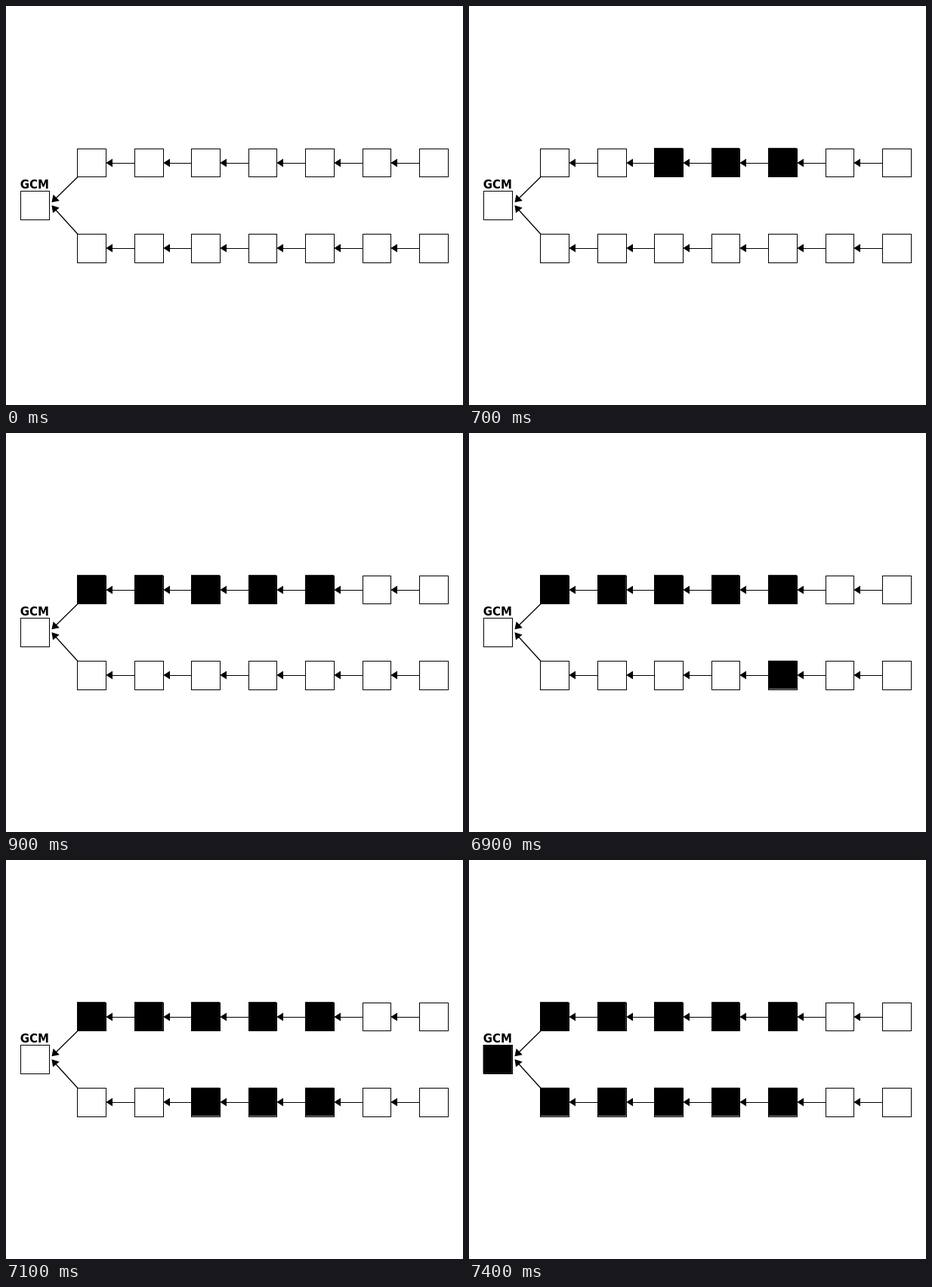
Animation, 605 px wide and 529 px high, one loop 7.5 s. Source, as an HTML page:

```html
<!DOCTYPE html>
<html lang="en">
<head>
<meta charset="utf-8">
<title>Marking two chains</title>
<style>
  html, body { margin: 0; width: 100%; height: 100%; overflow: hidden; background: #fff; }
  svg { display: block; width: 605px; height: 529px; }
  text { font: bold 15px "DejaVu Sans", Verdana, sans-serif; }
  .line { fill: none; stroke: #000; stroke-width: 1; }
  .slant { stroke-width: 1.3; }
</style>
</head>
<body>
<svg id="stage" viewBox="0 0 605 529">
  <text x="18.8" y="242">GCM</text>
</svg>
<script>
const LOOP = 7500, STEP = 100;
const stage = document.getElementById('stage');
const lefts = [94, 170, 245, 321, 396, 472, 547];
const rights = [132, 208, 283, 358, 434, 509, 585];
const marks = [];

function add(name, attrs) {
  const el = document.createElementNS('http://www.w3.org/2000/svg', name);
  for (const key in attrs) el.setAttribute(key, attrs[key]);
  stage.appendChild(el);
  return el;
}

const line = (d, extra = '') => add('path', { d, class: 'line ' + extra });
const head = points => add('polygon', { points });

function box(x1, y1, x2, y2) {
  add('rect', { x: x1 + .5, y: y1 + .5, width: x2 - x1, height: y2 - y1, class: 'line' });
}

// A black fill that appears at the given time and stays until the loop restarts
function mark(x1, y1, x2, y2, start) {
  const el = add('rect', { x: x1, y: y1, width: x2 - x1, height: y2 - y1, visibility: 'hidden' });
  marks.push({ el, start });
}

function chain(top, bottom, axis, fillTop, fillBottom, start) {
  lefts.forEach((x, i) => {
    if (i < 5) {
      const gap = i === 1 ? .25 : .1;
      mark(x, fillTop, rights[i] - gap, fillBottom, start + (4 - i) * STEP);
    }
    box(x, top, rights[i], bottom);
    if (i < 6) {
      const tip = rights[i] + .3;
      line(`M${tip + 8} ${axis + .5}H${lefts[i + 1]}`);
      head(`${tip},${axis} ${tip + 8.7},${axis - 5.5} ${tip + 8.7},${axis + 5.5}`);
    }
  });
}

chain(189, 226, 208, 188.2, 226.5, 500);
chain(302, 340, 321, 301.8, 339.4, 6900);

mark(18.6, 245, 56.8, 282.9, 7400);
box(19, 245, 57, 283);

line('M95 226.5L66 255', 'slant');
head('60.5,260.3 62.6,250 70.8,258.2');
line('M95 302.5L65.5 270', 'slant');
head('60.5,264.2 70.7,267.4 62.1,274.6');

function frame() {
  const t = performance.now() % LOOP;
  for (const { el, start } of marks) {
    el.setAttribute('visibility', t >= start ? 'visible' : 'hidden');
  }
  requestAnimationFrame(frame);
}
frame();
</script>
</body>
</html>
```
